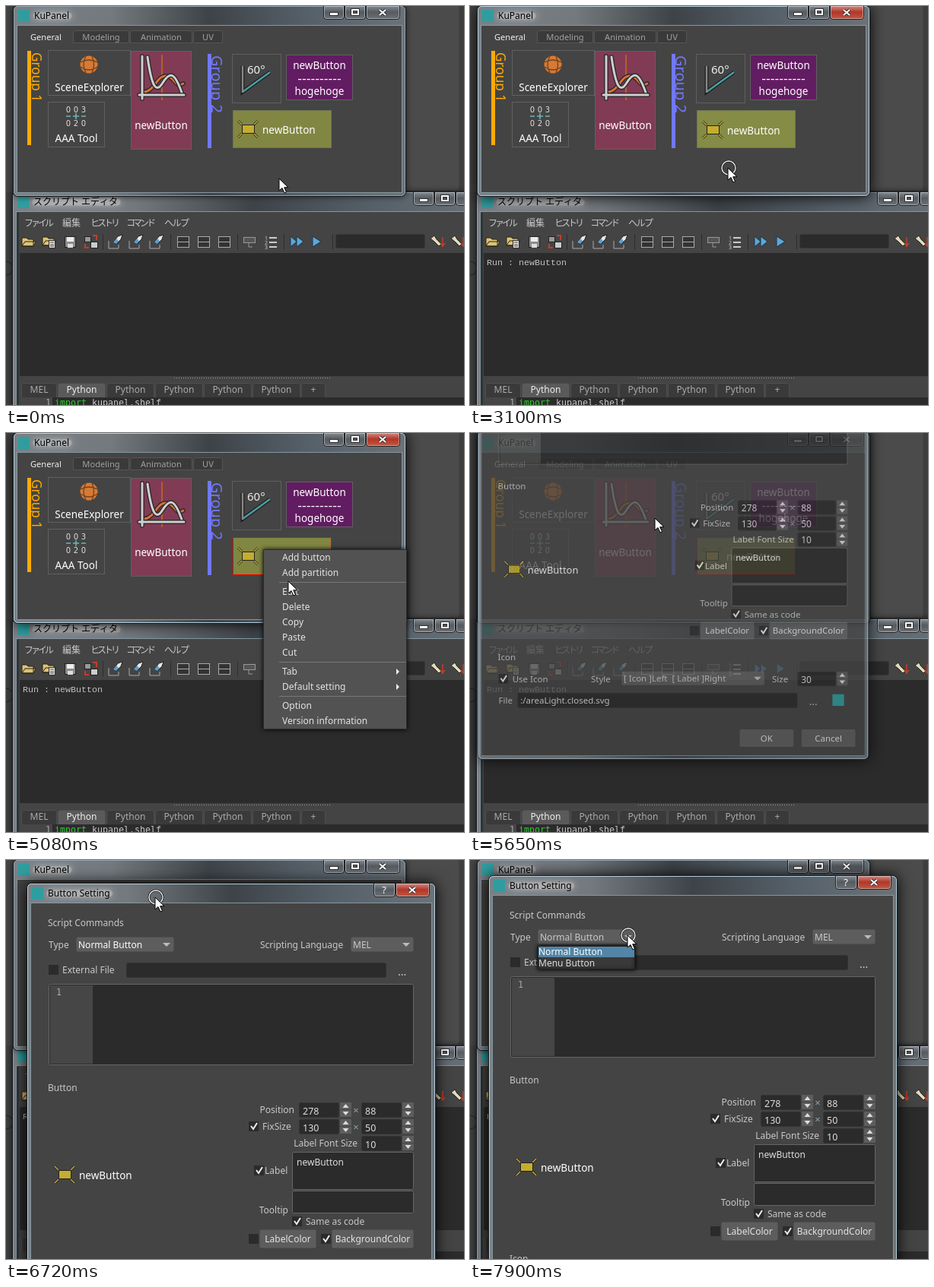
Animation of 602x525 px, one loop 8 s. Source, as an HTML page with a canvas:

```html
<!DOCTYPE html>
<html lang="ja">
<meta charset="utf-8">
<title>Shelf demo</title>
<style>
  html, body { margin: 0; width: 100%; height: 100%; overflow: hidden; background: #444; }
  canvas { display: block; }
</style>
<canvas id="stage" width="602" height="525"></canvas>
<script>
const LOOP = 8000, W = 602, H = 525;
const SANS = '"Noto Sans", "Noto Sans CJK JP", sans-serif';
const MONO = '"DejaVu Sans Mono", monospace';
const TYPEWRITER = '"Liberation Mono", monospace';
const TEXT = '#c8c8c8', FIELD = '#2b2b2b', PANEL = '#444', RAISED = '#5d5d5d', BLUE = '#5285a6', TEAL = '#2f9d9f';

const screen = document.getElementById('stage').getContext('2d');
const spare = Object.assign(document.createElement('canvas'), { width: W, height: H }).getContext('2d');
let c = screen;

// Drawing helpers
function box(x, y, w, h, fill, line) {
  if (fill) { c.fillStyle = fill; c.fillRect(x, y, w, h); }
  if (line) { c.strokeStyle = line; c.lineWidth = 1; c.strokeRect(x + .5, y + .5, w - 1, h - 1); }
}
function round(x, y, w, h, r, fill, line) {
  c.beginPath();
  c.roundRect(x + .5, y + .5, w - 1, h - 1, r);
  if (fill) { c.fillStyle = fill; c.fill(); }
  if (line) { c.strokeStyle = line; c.lineWidth = 1; c.stroke(); }
}
function text(s, x, y, color = TEXT, size = 12, align = 'left', font = SANS) {
  c.font = `${size}px ${font}`;
  c.textAlign = align;
  c.fillStyle = color;
  c.fillText(s, x, y + size * .36);
}
function path(d, line, width = 1, fill, x = 0, y = 0) {
  const p = new Path2D(d);
  c.save();
  c.translate(x, y);
  if (fill) { c.fillStyle = fill; c.fill(p); }
  if (line) { c.strokeStyle = line; c.lineWidth = width; c.stroke(p); }
  c.restore();
}
function layer(alpha, draw) {
  c = spare;
  c.clearRect(0, 0, W, H);
  c.save();
  draw();
  c.restore();
  c = screen;
  c.globalAlpha = alpha;
  c.drawImage(spare.canvas, 0, 0);
  c.globalAlpha = 1;
}
function shadow(blur, color, draw) {
  c.save();
  c.shadowBlur = blur;
  c.shadowColor = color;
  draw();
  c.restore();
}

// Value at time t from keys [time, ...values]
function at(t, keys) {
  let i = keys.findIndex(k => k[0] > t);
  if (i < 0) i = keys.length;
  const a = keys[Math.max(i - 1, 0)], b = keys[Math.min(i, keys.length - 1)];
  const u = a === b ? 0 : (t - a[0]) / (b[0] - a[0]), e = u * u * (3 - 2 * u);
  return a.slice(1).map((v, j) => v + (b[j + 1] - v) * e);
}
const within = (t, ranges) => ranges.some(([a, b]) => t >= a && t < b);

// Glass window
function glassWindow(x, y, w, h, title, active, help) {
  const r = x + w;
  shadow(active ? 20 : 8, active ? '#000' : 'rgba(0,0,0,.7)', () => round(x, y, w, h, 6, '#444'));
  const g = c.createLinearGradient(x, 0, Math.min(r, W + 40), 0);
  [[0, '#7b8187'], [.25, '#74797e'], [.5, '#3e4348'], [.75, '#566069'], [1, '#6c7378']]
    .forEach(s => g.addColorStop(...s));
  round(x, y, w, h, 6, g, '#15181a');
  round(x + 1, y + 1, w - 2, h - 2, 5, null, active ? '#b4cfdd' : '#8fa3ae');
  box(x + 5, y + 26, w - 10, h - 31, '#252a2d', '#8398a3');
  box(x + 6, y + 27, w - 12, h - 33, PANEL);
  shadow(10, '#ddd', () => {
    c.font = `12px ${SANS}`;
    round(x + 26, y + 9, c.measureText(title).width + 6, 10, 5, 'rgba(190,190,190,.55)');
  });
  box(x + 7, y + 6, 15, 16, TEAL);
  text(title, x + 28, y + 14, '#000');

  const button = (bx, bw, fill) => {
    const s = c.createLinearGradient(0, y, 0, y + 18);
    s.addColorStop(0, fill[0]); s.addColorStop(.5, fill[1]); s.addColorStop(1, fill[2]);
    round(bx, y, bw, 19, [0, 0, 4, 4], s, '#222');
    round(bx + 1, y + 1, bw - 2, 17, [0, 0, 3, 3], null, 'rgba(220,230,240,.5)');
  };
  const plain = ['#8b9196', '#555b60', '#6a7075'];
  button(r - 53, 45, active ? ['#d9958a', '#b0372a', '#c4573f'] : plain);
  path('M-4-3L4 4M4-3L-4 4', '#333', 4, null, r - 31, y + 9);
  path('M-4-3L4 4M4-3L-4 4', '#fff', 2, null, r - 31, y + 9);
  if (help) {
    button(r - 82, 29, plain);
    text('?', r - 68, y + 9, '#fff', 13, 'center');
  } else {
    button(r - 81, 28, plain);
    button(r - 109, 28, plain);
    box(r - 73, y + 4, 12, 10, '#fff', '#333');
    box(r - 70, y + 7, 6, 4, '#555', '#333');
    box(r - 101, y + 9, 12, 5, '#fff', '#333');
  }
}

function areaIcon(x, y) {
  for (const [sx, sy] of [[1, 1], [-1, 1], [1, -1], [-1, -1]]) {
    const d = `M${sx * 8} ${sy * 6}L${sx * 13} ${sy * 11}`;
    path(d, '#222', 3, null, x, y);
    path(d, '#c9b037', 1.4, null, x, y);
  }
  box(x - 8, y - 6, 17, 12, '#c4ad2f', '#222');
}

// Shelf window
function shelf(t, active, hover, pressed, selected) {
  glassWindow(9, -1, 517, 252, 'KuPanel', active);
  text('General', 32, 41, '#eee', 11.1);
  for (const [s, x, w] of [['Modeling', 88, 74], ['Animation', 163, 82], ['UV', 246, 39]]) {
    round(x, 32, w, 17, [3, 3, 0, 0], '#3a3a3a', '#555');
    text(s, x + w / 2, 41, '#a0a0a0', 11.1, 'center');
  }
  for (const [s, x, y, h, color, size] of [['Group 1', 28, 59, 124, '#ffaa00', 17.2], ['Group 2', 265, 63, 124, '#7078ff', 20]]) {
    box(x, y, 5, h, color);
    c.save();
    c.translate(x + 12, y + 2);
    c.rotate(Math.PI / 2);
    text(s, 0, 0, color, size);
    c.restore();
  }
  const label = (s, x, y, align = 'center') => text(s, x, y, '#fff', 13.5, align);
  const edge = '#606060';

  box(55, 58, 109, 60, PANEL, edge);
  c.beginPath(); c.arc(109, 77, 11.5, 0, 7); c.fillStyle = '#d67b35'; c.fill();
  path('M98 74Q109 68 120 74M98 80Q109 88 120 80M105 66Q99 77 105 88M113 66Q118 77 113 88', '#71401e', 1.3);
  label('SceneExplorer', 109.5, 107);

  box(55, 126, 75, 60, PANEL, edge);
  [['0', '0', '3'], ['0', '2', '0']].forEach((row, j) =>
    row.forEach((n, i) => text(n, 82 + i * 10, 136 + j * 18, '#ddd', 10, 'center', '"DejaVu Sans", sans-serif')));
  path('M79 145H85M88 145H96M99 145H105M92 141V149', '#6fb5b8', 1.5);
  label('AAA Tool', 92.5, 174);

  box(164, 59, 80, 130, '#813b55', edge);
  c.lineCap = 'round';
  path('M205 65V123', '#bd5a2c', 2);
  for (const [d, color] of [
    ['M181 113C195 113 199 90 211 92S222 109 233 102', '#d4743c'],
    ['M186 67C192 110 198 114 206 101S221 83 232 117', '#cfcfcf'],
    ['M179 66V122M175 117H234', '#cfcfcf']]) {
    path(d, '#252525', 5.5);
    path(d, color, 3);
  }
  c.lineCap = 'butt';
  label('newButton', 204, 157);

  box(297, 63, 65, 65, PANEL, edge);
  path('M311 79V113L347 87', '#202020', 5);
  path('M311 113L347 87', '#4aa0a3', 2.4);
  path('M311 79V114', '#888', 2.4);
  text('60°', 317, 84, '#eee', 15);

  box(368, 64, 88, 60, '#621c62', edge);
  label('newButton', 412, 78);
  text('----------', 412, 95, '#fff', 16, 'center', '"DejaVu Sans", sans-serif');
  label('hogehoge', 412, 112);

  const d = pressed ? 1 : 0;
  box(298, 137, 130, 50, hover ? '#848c45' : '#818643', selected ? '#f00' : '#70754c');
  areaIcon(318 + d, 162 + d);
  label('newButton', 337 + d, 163 + d, 'left');
}

// Script editor
function toolbar() {
  const folder = 'M0 12V1H6L8 3H15V12ZM0 12L4 6H18L15 12Z';
  path(folder, '#2a2412', 1, '#dcc27a', 21, 304);
  path(folder, '#2a2412', 1, '#dcc27a', 48, 303);
  box(56, 308, 9, 11, '#ddd', '#333');
  path('M58 311H63M58 314H63M58 316H63', '#555');
  box(77, 303, 15, 15, '#8c8c8c', '#222');
  box(80, 304, 9, 6, '#eee');
  box(81, 313, 7, 5, '#ddd');
  box(103, 303, 9, 8, '#999', '#222');
  box(111, 310, 10, 9, '#ccc', '#222');
  path('M114 302H119V308M104 313V318H109', '#c43d2a', 2);
  for (const x of [135, 162, 189]) {
    path('M0 6V16H13V11', '#aaa', 1, null, x, 303);
    path('M6 10L12 2L18 0L16 6L10 12Z', '#222', 1, '#e6e6e6', x, 301);
    path('M6 10L10 5L13 8L10 12Z', null, 1, '#5b9ecb', x, 301);
  }
  for (const x of [225, 252, 279]) {
    box(x, 303, 16, 15, '#333', '#aaa');
    path(`M${x} 310.5H${x + 16}`, '#aaa');
  }
  box(312, 304, 16, 8, '#555', '#999');
  path('M319 312V317H324', '#999');
  [1, 2, 3].forEach(n => {
    text(n, 340, 299 + n * 6, '#ccc', 7);
    box(346, 298 + n * 6, 10, 2, '#ccc');
  });
  path('M0 0L8 7L0 14ZM8 0L17 7L8 14Z', '#234', 1, '#5ba7dc', 374, 303);
  path('M0 0L11 7L0 14Z', '#234', 1, '#5ba7dc', 403, 303);
  for (const x of [127, 216, 304, 365, 429]) box(x, 300, 1, 21, '#2e2e2e');
  round(433, 300, 118, 19, 2, FIELD);
  for (const x of [558, 585]) {
    path('M0 4L5 0L8 5L14 11L11 14L5 8Z', '#222', 1, '#e2d9b8', x, 302);
    path('M16 304V315M13 312L16 316L19 312', '#c43d2a', 1.5, null, x, 0);
  }
}

function editor(t) {
  glassWindow(8, 244, 636, 400, 'スクリプト エディタ', false);
  box(14, 272, 588, 253, PANEL);
  box(14, 272, 3, 253, '#333');
  for (const [s, x, tight] of [['ファイル', 24, 3], ['編集', 74, 0], ['ヒストリ', 111, 3], ['コマンド', 158, 3], ['ヘルプ', 208, 1.5]]) {
    c.letterSpacing = -tight + 'px';
    text(s, x, 286);
  }
  c.letterSpacing = '0px';
  toolbar();
  box(18, 325, 584, 162, FIELD);
  if (t >= 2100) text('Run : newButton', 22, 337, '#c0c0c0', 11.67, 'left', TYPEWRITER);
  for (let x = 221; x < 428; x += 3) box(x, 489, 1, 1, '#999');
  ['MEL', 'Python', 'Python', 'Python', 'Python', 'Python', '+'].forEach((s, i) => {
    const x = i ? 4 + i * 64 : 20, w = i ? (i > 5 ? 32 : 63) : 47;
    round(x, 496, w, 20, [3, 3, 0, 0], i === 1 ? '#5a5a5a' : '#3a3a3a', '#4e4e4e');
    text(s, x + w / 2, 505, i === 1 ? '#eee' : '#aaa', 12, 'center');
  });
  box(20, 515, 582, 10, FIELD);
  box(20, 515, 41, 10, '#464646');
  text('1', 52, 522, '#aaa', 11.63, 'left', MONO);
  text('import', 64, 522, '#2fd02f', 11.63, 'left', 'bold ' === '' ? '' : MONO);
  text('kupanel.shelf', 113, 522, TEXT, 11.63, 'left', MONO);
}

// Context menu
const ITEMS = [['Add button', 164], ['Add partition', 184], ['Edit', 209], ['Delete', 229], ['Copy', 249], ['Paste', 269],
  ['Cut', 289], ['Tab', 314], ['Default setting', 334], ['Option', 359], ['Version information', 379]];
function menu(x, y) {
  shadow(6, '#000', () => box(338, 153, 189, 237, '#525252'));
  box(338, 153, 189, 237, '#525252', '#2d2d2d');
  for (const [s, cy] of ITEMS) {
    if (x > 338 && Math.abs(y - cy) < 10) box(339, cy - 10, 187, 20, BLUE);
    text(s, 363, cy, '#e4e4e4');
  }
  for (const sy of [196, 301, 346]) box(359, sy, 167, 1, '#777');
  for (const ay of [314, 334]) path('M513 -4L517 0L513 4Z', null, 1, '#eee', 0, ay);
}

// Button settings dialog, drawn from its own top left corner
function dialog(open) {
  glassWindow(0, 0, 538, 646, 'Button Setting', true, true);
  const field = (x, y, w, h) => round(x, y, w, h, 2, FIELD, '#333');
  const check = (x, y, on) => {
    box(x, y, 13, 13, FIELD);
    if (on) path('M3 6L6 10L11 2', '#eee', 2, null, x, y);
  };
  const combo = (s, x, y, w, color = TEXT) => {
    round(x, y, w, 20, 2, RAISED);
    text(s, x + 3, y + 10.5, color);
    path('M-5-2H5L0 3Z', null, 1, '#bbb', x + w - 10, y + 10);
  };
  const spin = (s, x, y) => {
    field(x, y, 53, 20);
    text(s, x + 5, y + 11, '#ddd', 12.5);
    for (const k of [0, 10]) box(x + 54, y + k, 15, 9, RAISED);
    path('M-4 2L0-3L4 2Z', null, 1, '#ddd', x + 61.5, y + 5);
    path('M-4-2L0 3L4-2Z', null, 1, '#ddd', x + 61.5, y + 14);
  };
  const push = (s, x, y, w, h = 25) => {
    round(x, y, w, h, 2, RAISED);
    text(s, x + w / 2, y + h / 2, '#e4e4e4', 12, 'center');
  };

  text('Script Commands', 28, 53);
  text('Type', 29, 82);
  combo('Normal Button', 65, 71, 129, open ? TEXT : '#fff');
  text('Scripting Language', 307, 82);
  combo('MEL', 426, 71, 83);
  check(29, 108);
  text('External File', 47, 115);
  field(131, 105, 342, 20);
  text('...', 488, 117, '#b8d4e4', 14);
  round(29, 133, 480, 107, 2, FIELD, '#666');
  box(31, 135, 56, 103, '#464646');
  text('1', 39, 144, '#aaa', 11.63, 'left', MONO);

  text('Button', 28, 270);
  text('Position', 352, 299, TEXT, 12, 'right');
  check(292, 314, true);
  text('FixSize', 310, 321);
  text('Label Font Size', 435, 343, TEXT, 12, 'right');
  spin('278', 358, 289); spin('88', 440, 289);
  spin('130', 358, 311); spin('50', 440, 311);
  spin('10', 440, 333);
  for (const y of [299, 321]) text('×', 433, y, '#8aa4b4', 13, 'center');
  check(299, 372, true);
  text('Label', 313, 379);
  round(349, 354, 160, 50, 2, FIELD, '#666');
  text('newButton', 355, 368, '#ddd');
  text('Tooltip', 344, 431, TEXT, 12, 'right');
  round(349, 405, 160, 30, 2, FIELD, '#666');
  check(349, 439, true);
  text('Same as code', 367, 446);
  check(292, 462);
  push('LabelColor', 306, 456, 75);
  check(387, 462, true);
  push('BackgroundColor', 401, 456, 108);
  areaIcon(50, 384);
  text('newButton', 69, 385, '#fff', 13.5);

  text('Icon', 28, 505);
  check(29, 528, true);
  text('Use Icon', 48, 535);
  text('Style', 156, 535);
  combo('[ Icon ]Left  [ Label ]Right', 198, 524, 197);
  text('Size', 405, 535);
  spin('30', 440, 525);
  text('File', 29, 565);
  field(55, 554, 385, 21);
  text(':/areaLight.closed.svg', 59, 565, '#ddd');
  text('...', 456, 566, '#b8d4e4', 14);
  box(488, 556, 16, 16, TEAL);
  push('OK', 360, 604, 75);
  push('Cancel', 445, 604, 75);

  if (open) {
    shadow(5, '#000', () => box(65, 93, 128, 31, '#393939', '#222'));
    box(66, 94, 126, 14, BLUE);
    text('Normal Button', 66, 101, '#fff');
    text('Menu Button', 66, 116, '#ddd');
  }
}

// Timeline
const POINTER = [[60, 359, 227], [240, 362, 226], [670, 362, 226], [1330, 342, 164], [2750, 342, 164], [3100, 339, 213],
  [3220, 339, 213], [3460, 339, 211], [3520, 339, 211], [4100, 337, 153], [4750, 337, 153], [5080, 371, 195],
  [5110, 371, 195], [5270, 373, 207], [5430, 373, 207], [5650, 243, 112], [5690, 243, 112], [5900, 167, -183]];
const DRAG = [[6530, 31, -156], [6590, 31, -156], [6650, 39, -50], [6720, 27, 30], [6820, 27, 30], [7280, 24, 20]];
const RELEASED = [[7340, 193, 39], [7780, 207, 99]];
const FADE = [[5540, 0], [5650, .78], [5690, .78], [5900, 1]];
const PRESSES = [[1730, 2100], [2750, 3400], [4140, 4260], [5430, 5540], [6530, 7280], [7780, LOOP]];

function frame() {
  const t = performance.now() % LOOP;
  const [dx, dy] = t < 6530 ? [-2, -202] : at(t, DRAG);
  const [px, py] = t < 6530 ? at(t, POINTER) : t < 7340 ? [dx + 169, dy + 19] : at(t, RELEASED);
  const held = within(t, [[1730, 1790], [2750, 3400]]);
  const inside = px >= 298 && px < 428 && py >= 137 && py < 187;

  box(0, 0, W, H, '#3e3e3e');
  box(0, 0, 9, 244, '#444');
  round(520, -8, 76, 251, 4, '#4b4b4b');
  c.beginPath(); c.arc(0, 345, 9, 0, 7); c.strokeStyle = '#222'; c.lineWidth = 1; c.stroke();

  editor(t);
  shelf(t, within(t, [[1730, 5430]]), held || (inside && t < 4260), held, t >= 4200);

  if (within(t, [[4200, 5490]])) {
    const [alpha] = at(t, [[4200, .2], [4320, 1], [5430, 1], [5490, 0]]);
    layer(alpha, () => menu(px, py));
  }
  const [shown] = at(t, FADE);
  if (shown > 0) layer(shown, () => {
    c.translate(dx + 269, dy + 323);
    c.scale(.8 + .2 * shown, .8 + .2 * shown);
    c.translate(-269, -323);
    dialog(t >= 7840);
  });

  if (within(t, PRESSES)) {
    for (const [color, width] of [['#222', 3], ['#eee', 1.4]]) {
      c.beginPath(); c.arc(px + 1, py, 9, 0, 7);
      c.strokeStyle = color; c.lineWidth = width; c.stroke();
    }
  }
  path('M0 0V16L4 12.5L7 19L9.5 18L6.7 11.7H12Z', '#000', 1, '#fff', px, py);
  requestAnimationFrame(frame);
}
frame();
</script>
</html>
```
